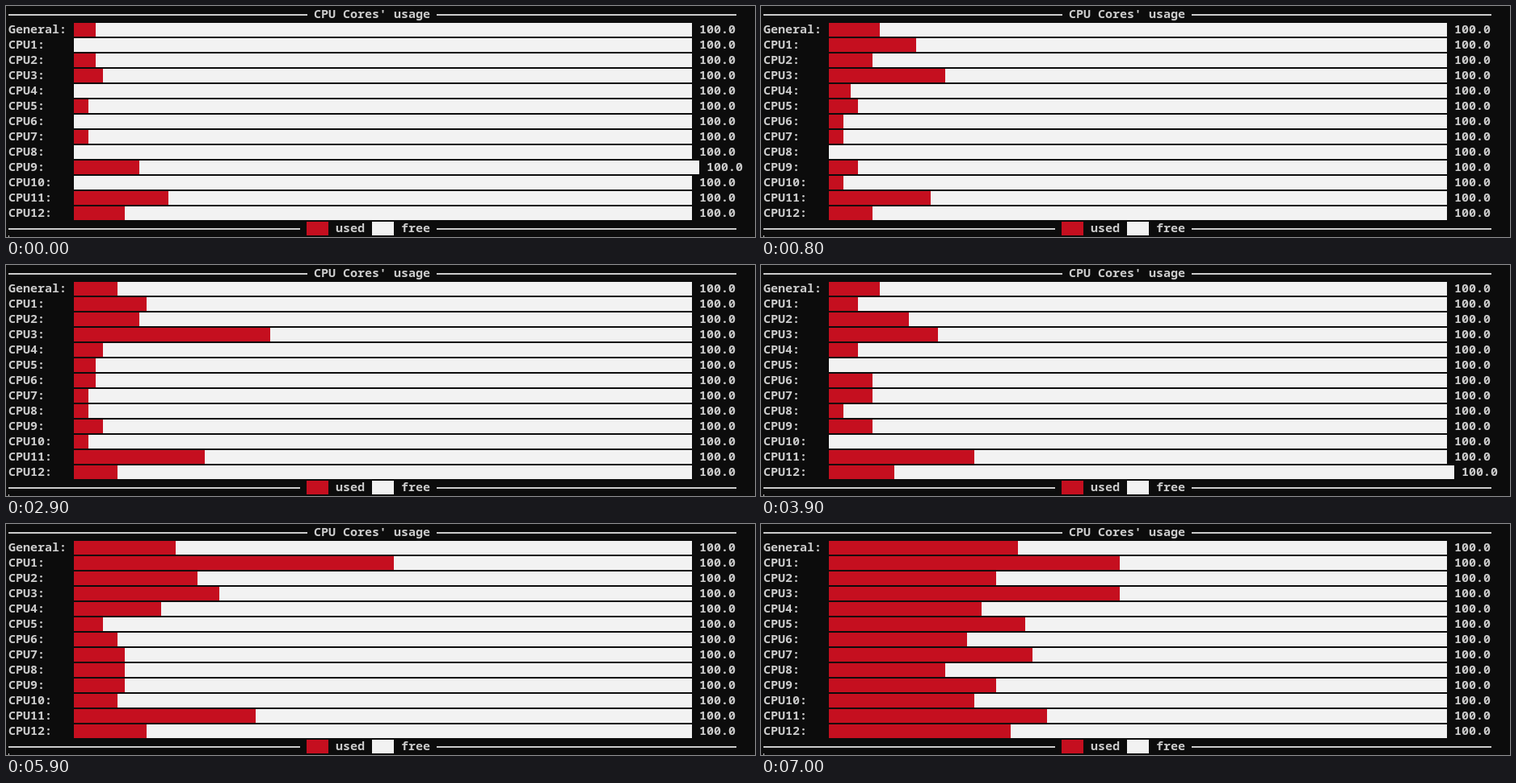
Recreate the animation shown at these times as an HTML page. Size 927 by 287 pixels, loop 8 s.

```html
<!DOCTYPE html>
<html lang="en">
<head>
<meta charset="utf-8">
<title>CPU usage</title>
<style>
  html, body { margin: 0; width: 100%; height: 100%; overflow: hidden; background: #0c0c0c; }
  svg { display: block; }
  text { font: 600 15px "Noto Sans Mono", "Liberation Mono", monospace; fill: #ccc; white-space: pre; }
</style>
</head>
<body>
<svg id="stage" width="927" height="287" viewBox="0 0 927 287"></svg>
<script>
const CELL = 9, ROW = 19, LEFT = 3, BAR_X = 84, BAR_CELLS = 85, BAR_H = 17;
const RED = '#c50f1f', WHITE = '#f2f2f2', GREY = '#ccc';
const LOOP = 8000;

// Used cells per row (General, CPU1 … CPU12); `wide` is a row one cell longer.
const samples = [
  { at: 0,    wide: 9,  used: [3, 0, 3, 4, 0, 2, 0, 2, 0, 9, 0, 13, 7] },
  { at: 800,  wide: -1, used: [7, 12, 6, 16, 3, 4, 2, 2, 0, 4, 2, 14, 6] },
  { at: 1900, wide: -1, used: [7, 16, 7, 23, 2, 7, 0, 0, 0, 3, 0, 15, 4] },
  { at: 2900, wide: -1, used: [6, 10, 9, 27, 4, 3, 3, 2, 2, 4, 2, 18, 6] },
  { at: 3900, wide: 12, used: [7, 4, 11, 15, 4, 0, 6, 6, 2, 6, 0, 20, 9] },
  { at: 4900, wide: -1, used: [4, 18, 2, 18, 3, 0, 2, 0, 0, 0, 2, 6, 3] },
  { at: 5900, wide: -1, used: [14, 44, 17, 20, 12, 4, 6, 7, 7, 7, 6, 25, 10] },
  { at: 7000, wide: -1, used: [26, 40, 23, 40, 21, 27, 19, 28, 16, 23, 20, 30, 25] }
];

const stage = document.getElementById('stage');

function add(tag, attrs, content = '') {
  const el = document.createElementNS('http://www.w3.org/2000/svg', tag);
  for (const name in attrs) el.setAttribute(name, attrs[name]);
  el.textContent = content;
  stage.appendChild(el);
  return el;
}
const rect = (x, y, width, height, fill) => add('rect', { x, y, width, height, fill });
const label = (x, y, content) => add('text', { x, y }, content);
const rule = (from, to, y) => rect(from, y, to - from, 2, GREY);

rule(LEFT, 373, 10);
label(381, 15, "CPU Cores' usage");
rule(533, 904, 10);

const rows = samples[0].used.map((_, i) => {
  const y = 21 + ROW * i, baseline = y + 13;
  label(LEFT, baseline, i ? `CPU${i}:` : 'General:');
  return {
    free: rect(BAR_X, y, 0, BAR_H, WHITE),
    used: rect(BAR_X, y, 0, BAR_H, RED),
    total: label(0, baseline, '100.0')
  };
});

rule(LEFT, 364, 276);
rect(372, 268, 27, BAR_H, RED);
label(408, 281, 'used');
rect(453, 268, 27, BAR_H, WHITE);
label(489, 281, 'free');
rule(533, 904, 276);
rect(LEFT, 285, 1, 2, GREY);

let shown;
function draw(time) {
  const sample = samples.findLast(s => s.at <= time % LOOP);
  if (sample === shown) return;
  shown = sample;
  rows.forEach((row, i) => {
    const width = (BAR_CELLS + (i === sample.wide ? 1 : 0)) * CELL;
    row.free.setAttribute('width', width);
    row.used.setAttribute('width', sample.used[i] * CELL);
    row.total.setAttribute('x', BAR_X + width + CELL);
  });
}

const start = performance.now();
function tick() {
  draw(performance.now() - start);
  requestAnimationFrame(tick);
}
tick();
</script>
</body>
</html>
```
